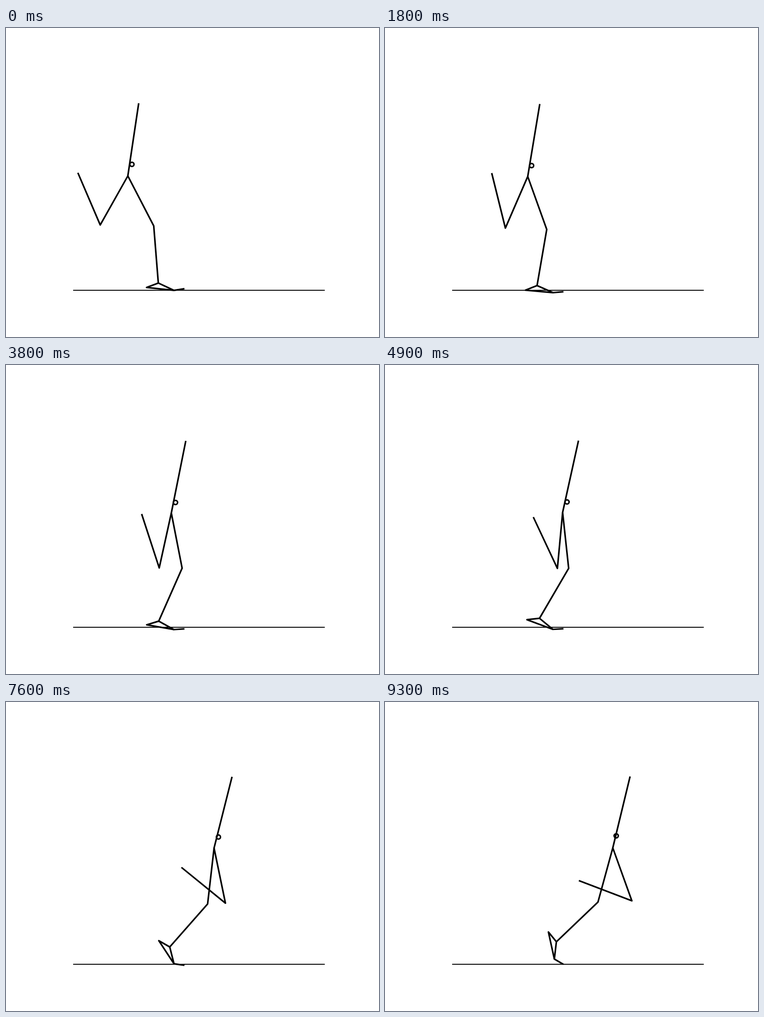
Write an HTML page with a canvas that moves like this. It is 822 by 681 pixels and loops after 9400 ms.

```html
<!DOCTYPE html>
<html lang="en">
<head>
<meta charset="utf-8">
<title>Walking step</title>
<style>
  html, body { margin: 0; width: 100%; height: 100%; overflow: hidden; background: #fff; }
  canvas { display: block; }
</style>
</head>
<body>
<canvas id="stage" width="822" height="681"></canvas>
<script>
const ctx = document.getElementById('stage').getContext('2d');
const LOOP = 9400, STEP = 100, LAST = LOOP - STEP;
const TRUNK = 162, THIGH = 124, SHIN = 125;
const TOE = 23.3, SOLE = 61, INSTEP = 38.3, INSTEP_ANGLE = 19.1;

// Cubic Bezier from a to d with control values b and c.
function ease(u, a, b, c, d) {
  const v = 1 - u;
  return v * v * v * a + 3 * v * v * u * b + 3 * v * u * u * c + u * u * u * d;
}

// End of a limb; 0 degrees hangs straight down, positive swings forward.
function limb([x, y], length, degrees) {
  const a = degrees * Math.PI / 180;
  return [x + length * Math.sin(a), y + length * Math.cos(a)];
}

// Point behind a foot joint; positive degrees raise it.
const behind = (joint, length, degrees) => limb(joint, length, degrees - 90 - 2 * degrees + 2 * degrees * 0 + 0);

function line(width, ...points) {
  ctx.lineWidth = width;
  ctx.beginPath();
  points.forEach(p => ctx.lineTo(...p));
  ctx.stroke();
}

// Pose at u, running from 0 (landing) to 1 (push-off).
function pose(u) {
  const hip = [ease(u, 268.5, 349.3, 421.3, 502), ease(u, 326, 330.7, 320.5, 321.5)];
  const head = limb(hip, TRUNK, 180 - ease(u, 8.5, 9, 16.2, 13.6));
  const mass = [hip[0] + ease(u, 9, 6.5, 13.5, 7.5), hip[1] + ease(u, -25.5, -22.5, -21.5, -26.5)];

  const swingKnee = limb(hip, THIGH, ease(u, -29.4, -23.5, 8.1, 19.8));
  const swingAnkle = limb(swingKnee, SHIN, 180 + ease(u, 23.2, -5.5, 36.8, 69.1));

  // The planted foot settles, rolls off its heel, then lifts over the toe.
  const landing = Math.exp(-20 * u), lift = u ** 5;
  const roll = Math.max(0, (u - 0.3) / 0.7);
  const toe = [393.3, 581.5 - 7 * landing - 3.2 * lift];
  const ball = behind(toe, TOE, -4.5 - 5 * landing + 34.9 * lift);
  const soleAngle = ease(roll, 5, 9.8, 55.8, 77.6) + 1.1 * landing;
  const heel = behind(ball, SOLE, soleAngle);
  const ankle = behind(ball, INSTEP, soleAngle + INSTEP_ANGLE);
  const knee = limb(hip, THIGH, ease(u, 27.4, 14.2, 1.2, -15.3));

  return { hip, head, mass, swingKnee, swingAnkle, knee, ankle, heel, ball, toe };
}

function draw(u) {
  const p = pose(u);
  ctx.fillStyle = '#fff';
  ctx.fillRect(0, 0, 822, 681);
  ctx.strokeStyle = '#000';
  ctx.lineJoin = 'round';
  line(2, [148, 578], [702.5, 578]);
  line(3.5, p.head, p.hip, p.swingKnee, p.swingAnkle);
  line(3.5, p.hip, p.knee, p.ankle, p.heel, p.ball);
  line(3.5, p.ankle, p.ball, p.toe);
  ctx.lineWidth = 3.3;
  ctx.beginPath();
  ctx.arc(...p.mass, 4.6, 0, 2 * Math.PI);
  ctx.stroke();
}

function frame() {
  const now = performance.now() % LOOP;
  draw(Math.floor(now / STEP) * STEP / LAST);
  requestAnimationFrame(frame);
}
frame();
</script>
</body>
</html>
```
